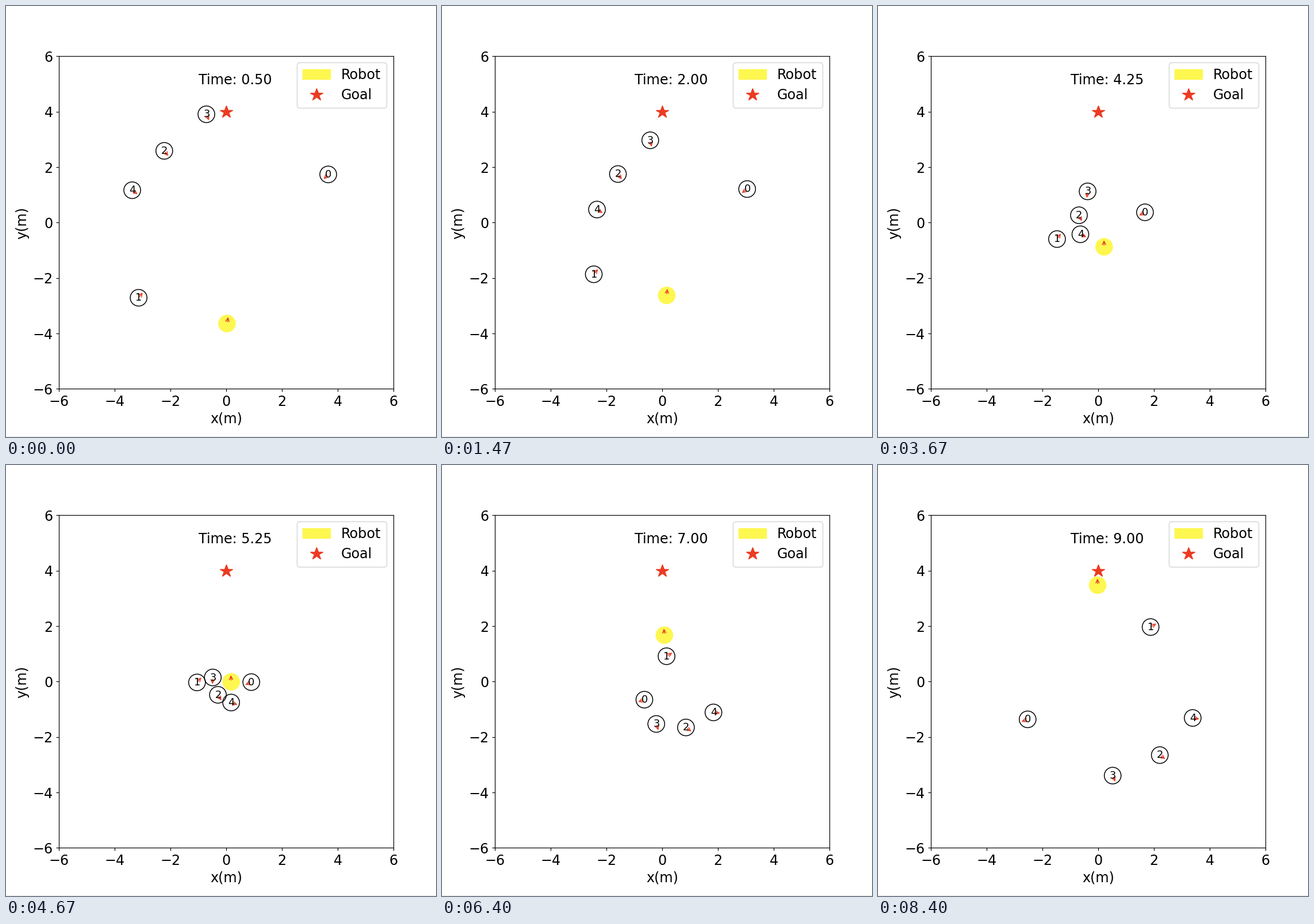
Write a matplotlib script that moves like this. It is 748x749 px and loops after 8.59 s.

```python
import numpy as np
import matplotlib.pyplot as plt
from matplotlib.animation import FuncAnimation
from matplotlib.lines import Line2D
from matplotlib.patches import ArrowStyle, Circle, FancyArrowPatch, Rectangle

W, H, DPI = 748, 749, 107.25
LOOP_MS, FRAMES = 8590, 129
LEFT, RIGHT, TOP, BOTTOM = 92, 674, 87.5, 665.5
RED, YELLOW = "#eb3b22", "#fef750"
RADIUS, START, STEP = 0.3, 0.5, 0.25

# Key points in metres, passed at the times in KEYS; the robot comes first.
KEYS = np.array([START, 3, 6.25, 7.75, 9])
ROUTES = np.array([
    [(0.03, -3.64), (0.21, -1.88), (0.13, 0.92), (0.03, 2.42), (-0.02, 3.48)],
    [(3.66, 1.74), (2.51, 0.85), (0.05, -0.39), (-1.35, -0.91), (-2.53, -1.36)],
    [(-3.14, -2.71), (-1.99, -1.30), (-0.45, 0.52), (0.81, 1.31), (1.88, 1.97)],
    [(-2.22, 2.59), (-1.16, 1.14), (0.26, -1.17), (1.45, -2.09), (2.21, -2.65)],
    [(-0.71, 3.91), (-0.32, 2.23), (-0.42, -0.82), (0.05, -2.23), (0.52, -3.39)],
    [(-3.37, 1.17), (-1.60, 0.06), (1.07, -1.00), (2.56, -1.19), (3.39, -1.31)],
])
SPEEDS = np.gradient(ROUTES, KEYS, axis=1, edge_order=2)


def positions(t):
    """Smooth cubic path of every agent through its key points."""
    i = np.clip(np.searchsorted(KEYS, t, side="right") - 1, 0, len(KEYS) - 2)
    h = KEYS[i + 1] - KEYS[i]
    u = (t - KEYS[i]) / h
    p, q = ROUTES[:, i], ROUTES[:, i + 1]
    v, w = SPEEDS[:, i] * h, SPEEDS[:, i + 1] * h
    return p + u * u * (3 - 2 * u) * (q - p) + u * (1 - u) * ((1 - u) * v - u * w)


def headings(t, lag=0.1):
    """Unit vectors along the latest movement."""
    move = positions(t) - positions(t - lag)
    return move / np.linalg.norm(move, axis=1, keepdims=True)


fig = plt.figure(figsize=((W + 0.01) / DPI, (H + 0.01) / DPI), dpi=DPI, facecolor="white")
fig.add_artist(Rectangle((0, 0), 1, 1 / H, color="#e4e4e4", lw=0))
ax = fig.add_axes([LEFT / W, 1 - BOTTOM / H, (RIGHT - LEFT) / W, (BOTTOM - TOP) / H])
ax.set(xlim=(-6, 6), ylim=(-6, 6), xticks=range(-6, 7, 2), yticks=range(-6, 7, 2))
ax.tick_params(labelsize=16)
ax.set_xlabel("x(m)", fontsize=16)
ax.set_ylabel("y(m)", fontsize=16)

goal = Line2D([0], [4], color=RED, marker="*", linestyle="None", markersize=15)
ax.add_line(goal)
robot = Circle((0, 0), RADIUS, color=YELLOW)
humans = [Circle((0, 0), RADIUS, fill=False) for _ in ROUTES[1:]]
bodies = [robot] + humans
for body in bodies:
    ax.add_patch(body)
head = ArrowStyle("->", head_length=4, head_width=2)
arrows = [ax.add_patch(FancyArrowPatch((0, 0), (0, RADIUS), color=RED, arrowstyle=head))
          for _ in bodies]
labels = [ax.text(0, 0, str(i), fontsize=12) for i in range(len(humans))]
clock = ax.text(-1, 5, "", fontsize=16)
ax.legend([robot, goal], ["Robot", "Goal"], loc="upper right", fontsize=16,
          bbox_to_anchor=(0.999, 1.002), labelspacing=0.47)


def update(frame):
    # Four simulation steps per fifteen frames.
    t = START + STEP * ((frame - 2) * 4 // 15 + 1)
    now = positions(t)
    for body, arrow, pos, way in zip(bodies, arrows, now, headings(t)):
        body.center = tuple(pos)
        arrow.set_positions(tuple(pos), tuple(pos + RADIUS * way))
    for label, pos in zip(labels, now[1:]):
        label.set_position(pos - 0.11)
    clock.set_text(f"Time: {t:.2f}")
    return bodies + arrows + labels + [clock]


anim = FuncAnimation(fig, update, frames=FRAMES, interval=LOOP_MS / FRAMES,
                     init_func=lambda: update(0), repeat=True, repeat_delay=0)
plt.show()
```
